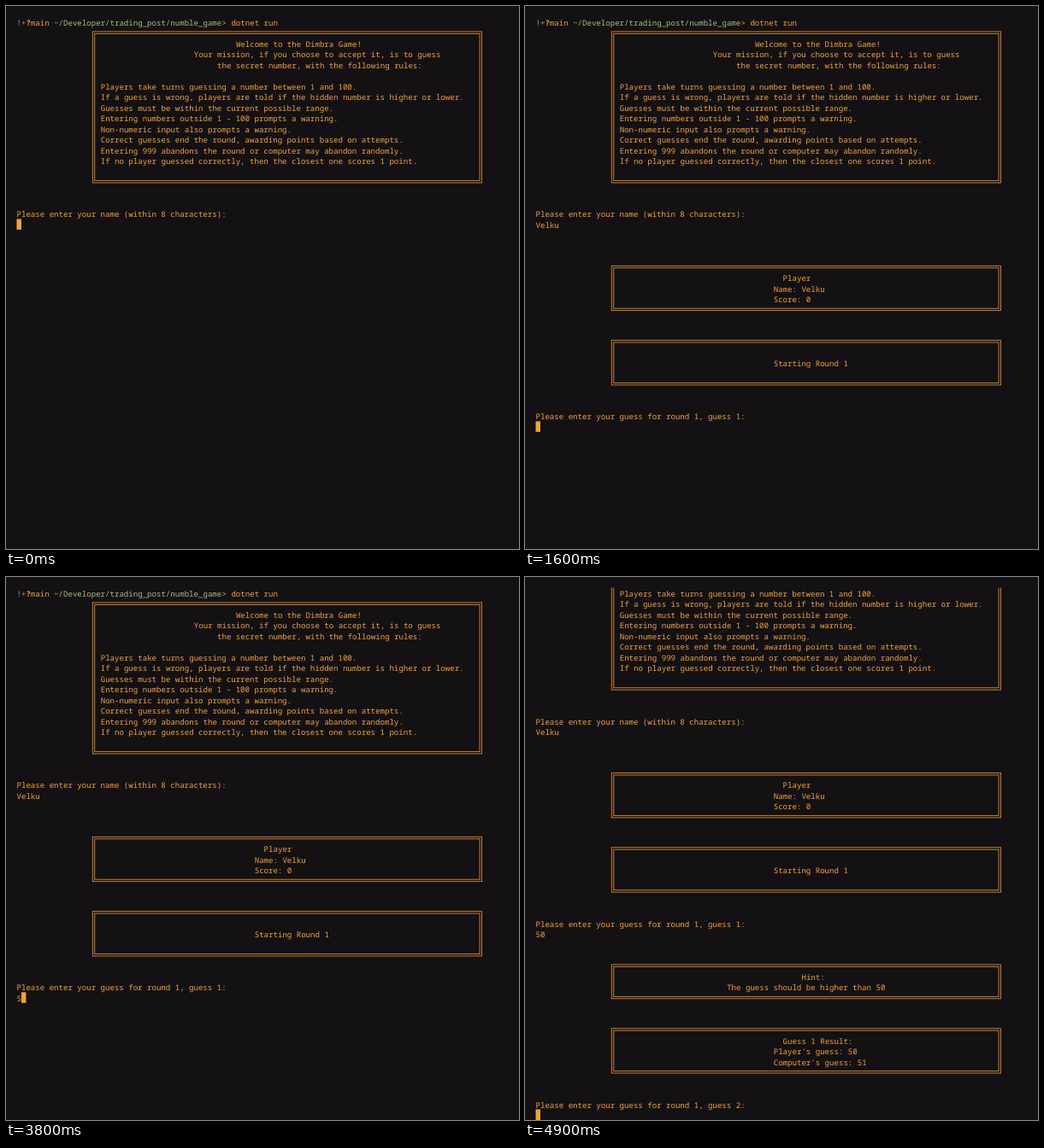
Animation, 600 px wide and 636 px high, one loop 5000 ms. Source, as an HTML page with a canvas:

```html
<!DOCTYPE html>
<html lang="en">
<head>
<meta charset="utf-8">
<title>Terminal guessing game</title>
<style>
  html, body { margin: 0; width: 100%; height: 100%; overflow: hidden; background: #131114; }
  canvas { display: block; }
</style>
</head>
<body>
<canvas id="screen" width="600" height="636"></canvas>
<script>
const ctx = document.getElementById('screen').getContext('2d');
const LOOP = 5000, LEFT = 12.5, TOP = 12.5, CELL_W = 5.455, CELL_H = 12.47;
const ORANGE = '#f5a13f', GREEN = '#a6c083', GREY = '#a09c88', LINE = '#d98c3a', BACK = '#131114';
const FAMILY = '"Noto Sans Mono", monospace';

// Pick the font size whose natural advance equals one terminal cell.
ctx.textRendering = 'geometricPrecision';
ctx.font = `500 100px ${FAMILY}`;
const fontSize = 100 * CELL_W / ctx.measureText('M').width;

const PLAYER = 'Velku', GUESS = '50';
const NAME_START = 500, KEY_GAP = 100, NAME_ENTER = 1600;
const GUESS_KEYS = [3500, 4000], GUESS_ENTER = 4400, SCROLL_ROWS = 6;

const RULES = [
  'Players take turns guessing a number between 1 and 100.',
  'If a guess is wrong, players are told if the hidden number is higher or lower.',
  'Guesses must be within the current possible range.',
  'Entering numbers outside 1 - 100 prompts a warning.',
  'Non-numeric input also prompts a warning.',
  'Correct guesses end the round, awarding points based on attempts.',
  'Entering 999 abandons the round or computer may abandon randomly.',
  'If no player guessed correctly, then the closest one scores 1 point.'
];

const x = col => LEFT + col * CELL_W;
const y = row => TOP + row * CELL_H;

function print(row, col, text, color = ORANGE, weight = 500) {
  ctx.font = `${weight} ${fontSize}px ${FAMILY}`;
  ctx.fillStyle = color;
  ctx.fillText(text, x(col), y(row) + 10.5);
}

function box(top, bottom) {
  for (const gap of [-1.2, 1.2]) {
    const left = x(16.5) + gap, upper = y(top + 0.5) + gap;
    ctx.strokeRect(left, upper, x(99.5) - gap - left, y(bottom + 0.5) - gap - upper);
  }
}

function input(row, text, active) {
  print(row, 0, text);
  if (active) ctx.fillRect(x(text.length), y(row), CELL_W, CELL_H);
}

function intro() {
  print(0, 0, '!+', GREY);
  print(0, 2, '?', ORANGE, 700);
  print(0, 3, 'main');
  print(0, 8, '~/Developer/trading_post/numble_game', GREEN);
  print(0, 44, '> dotnet run');
  box(1, 15);
  print(2, 47, 'Welcome to the Dimbra Game!');
  print(3, 38, 'Your mission, if you choose to accept it, is to guess');
  print(4, 43, 'the secret number, with the following rules:');
  RULES.forEach((rule, i) => print(6 + i, 18, rule));
  print(18, 0, 'Please enter your name (within 8 characters):');
}

function roundStart() {
  box(23, 27);
  print(24, 53, 'Player');
  print(25, 51, 'Name: ' + PLAYER);
  print(26, 51, 'Score: 0');
  box(30, 34);
  print(32, 51, 'Starting Round 1');
  print(37, 0, 'Please enter your guess for round 1, guess 1:');
}

function guessResult() {
  box(41, 44);
  print(42, 57, 'Hint:');
  print(43, 41, 'The guess should be higher than ' + GUESS);
  box(47, 51);
  print(48, 53, 'Guess 1 Result:');
  print(49, 51, "Player's guess: " + GUESS);
  print(50, 51, "Computer's guess: 51");
  print(54, 0, 'Please enter your guess for round 1, guess 2:');
  input(55, '', true);
}

function draw(t) {
  const named = t >= NAME_ENTER, guessed = t >= GUESS_ENTER;
  const nameKeys = Math.max(0, Math.floor((t - NAME_START) / KEY_GAP) + 1);
  const guessKeys = GUESS_KEYS.filter(time => t >= time).length;

  ctx.fillStyle = BACK;
  ctx.fillRect(0, 0, 600, 636);
  ctx.save();
  ctx.beginPath();
  ctx.rect(0, TOP, 600, 636);
  ctx.clip();
  if (guessed) ctx.translate(0, -SCROLL_ROWS * CELL_H);
  ctx.strokeStyle = LINE;
  ctx.lineWidth = 0.9;

  intro();
  input(19, PLAYER.slice(0, nameKeys), !named);
  if (named) {
    roundStart();
    input(38, GUESS.slice(0, guessKeys), !guessed);
  }
  if (guessed) guessResult();
  ctx.restore();
}

function tick() {
  draw(performance.now() % LOOP);
  requestAnimationFrame(tick);
}
tick();
</script>
</body>
</html>
```
